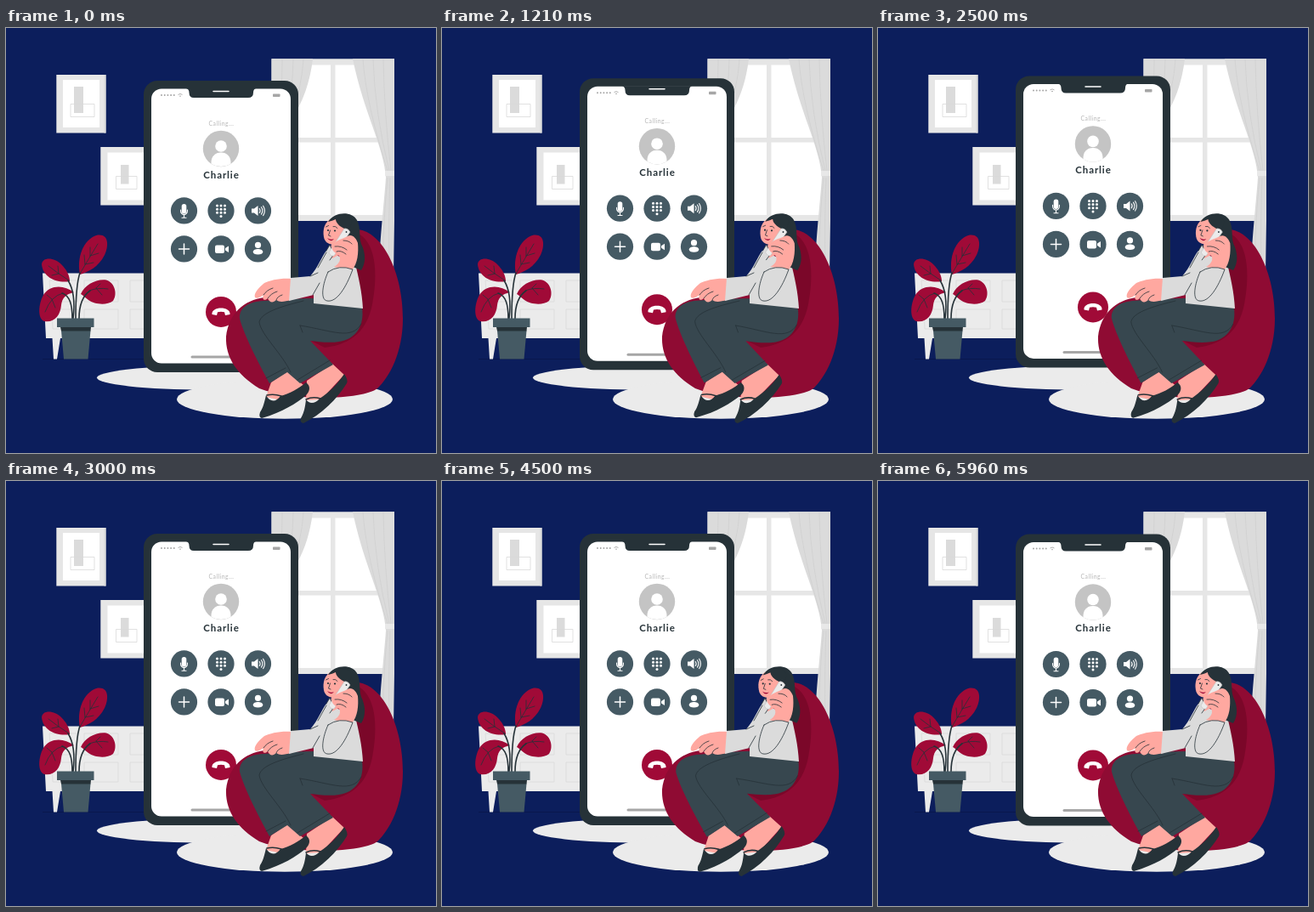
Recreate the animation shown at these times as an HTML page. Size 506 by 500 pixels, loop 6 s.

```html
<!DOCTYPE html>
<html lang="en">
<head>
<meta charset="utf-8">
<title>Calling</title>
<style>
  html, body { margin: 0; width: 100%; height: 100%; overflow: hidden; background: #0c1e5c; }
  svg { display: block; width: 100vw; height: 100vh; }
  text { font-family: Lato, "Open Sans", sans-serif; text-anchor: middle; }
  .line { fill: none; stroke: #263238; stroke-width: .8; stroke-linecap: round; stroke-linejoin: round; }
  .stem { stroke-width: 1.6; }
  .faint { fill: none; stroke: #dadada; stroke-width: .8; }
  .dark { fill: #263238; }
  .slate { fill: #455a64; }
  .pale { fill: #ebebeb; }
  .grey { fill: #dbdbdb; }
  .white { fill: #fff; }
  .red { fill: #a00a37; }
  .skin { fill: #ffa8a0; }
  .glyph { fill: none; stroke: #fff; stroke-width: 1.5; stroke-linecap: round; }
  .thin { stroke-width: 1.1; }
</style>
</head>
<body>
<svg viewBox="0 0 506 500">
  <path d="M43 389.500H300" stroke="#09164a" stroke-width=".8"/>

  <g id="window">
    <path fill="#e6e6e6" d="M312.500 36.300H457V227H312.500Z"/>
    <path class="white" d="M319 43.500H382V129H319ZM387.500 43.500H450V129H387.500ZM319 134.500H382V220H319ZM387.500 134.500H450V220H387.500Z"/>
    <path class="grey" d="M312.500 36.300H361C358 62 350 88 334 110L312.500 150Z"/>
    <path class="grey" d="M408 36.300H457V227L456 290H438.500C440 245 445 205 447 176C445 140 421 100 408 36.300Z"/>
    <path fill="none" stroke="#cfcfcf" stroke-width=".7" d="M325 37Q326 80 314 125M338 37Q338 75 326 115M350 37Q348 70 335 105M420 37Q424 90 449 168M432 37Q434 100 451 168M444 37Q445 100 453 168M449 176Q444 225 444 270M452 176Q450 225 451 280"/>
    <path fill="#e8e8e8" d="M446 168H457V174H446Z"/>
  </g>

  <g id="pictures">
    <path fill="#e6e6e6" d="M59.300 55H117.500V123.500H59.300ZM111.300 140H170V208.500H111.300Z"/>
    <path class="grey" d="M115.500 55H117.500V123.500H115.500Z"/>
    <path class="white" d="M67 61H110V117H67ZM119.500 146.500H165V202.500H119.500Z"/>
    <path class="grey" d="M80 69H91V100H80ZM135 161H144.500V183.500H135Z"/>
    <path class="faint" d="M76 89.500H104V104.500H76ZM129.500 174.500H154V189.500H129.500Z"/>
  </g>

  <g id="cabinet">
    <path class="pale" d="M43 288.500H180V365H47ZM54.500 365H64L60 389.500H56Z"/>
    <path class="faint" d="M51 297H84V322H53ZM92 297H132V322H92ZM146 297H180V322H146ZM54 331H84V354H55ZM92 331H132V354H92ZM146 331H180V354H146Z"/>
  </g>

  <g class="pale">
    <ellipse cx="235" cy="411.500" rx="128" ry="14"/>
    <ellipse cx="328" cy="436.800" rx="127" ry="23"/>
  </g>

  <g id="plant">
    <g class="red">
      <path d="M87 290C83 272 90 248 108 243.500C121 242 121 256 116 267C109 281 97 287 87 290Z"/>
      <path d="M75 298C60 301 43 293 42 278C43 269 57 270 65 278C71 284 75 291 75 298Z"/>
      <path d="M80 311C68 302 52 302 44 314C38 325 37 342 45 345C57 347 64 338 65 326C66 318 70 313 80 311Z"/>
      <path d="M88 313C93 302 106 295 118 296.500C129 300 131 314 126 321C118 327 104 325 97 320C93 317 90 314 88 313Z"/>
    </g>
    <path class="line stem" d="M79 342C81 325 80 308 73 297M82 342C82 320 83 300 87 288M86 342C86 325 90 315 99 309M78 342C78 325 75 315 66 312"/>
    <path class="line" d="M87 289Q97 272 108 254M93 278L92 267M93 278L103 276M99 268L99 258M99 268L109 265M74 297Q60 288 50 280M62 289L61 280M62 289L54 291M67 312Q53 315 46 334M54 319L48 314M54 319L58 329M98 309Q108 305 120 307M106 306L111 301M106 306L113 314"/>
    <path class="slate" d="M60 341.500H103.500V352H60ZM65 356H99.500L96.500 389.500H68Z"/>
    <path class="dark" d="M64 352H100L99.500 356.500H65Z"/>
  </g>

  <g id="phone">
    <rect class="dark" x="162" y="63" width="182" height="343" rx="16"/>
    <rect class="white" x="171" y="72.500" width="164" height="323" rx="12"/>
    <path class="dark" d="M212 72H294Q291 73 291 77Q291 83 285 83H221Q215.500 83 215.500 77Q215.500 73 212 72Z"/>
    <path class="glyph" d="M244 75.500H262"/>
    <path d="M183 80H199" stroke="#a6a6a6" stroke-width="2" stroke-linecap="round" stroke-dasharray="0 3.700"/>
    <path d="M202.500 79.500Q205 77.500 207.500 79.500M204 81.200H206" fill="none" stroke="#a6a6a6" stroke-width=".9"/>
    <rect x="314" y="78.500" width="8.500" height="3.500" rx=".7" fill="#a6a6a6"/>
    <text x="253.500" y="115.800" font-size="6.800" letter-spacing=".5" fill="#b4b4b4">Calling...</text>
    <circle cx="253" cy="143" r="21.200" fill="#c4c4c4"/>
    <circle class="white" cx="253" cy="140" r="6.800"/>
    <path class="white" d="M241.500 161C241 152 246 147.500 253 147.500S265 152 264.500 161Q253 167 241.500 161Z"/>
    <text x="253.500" y="178" font-size="11.500" font-weight="700" letter-spacing=".9" fill="#263238">Charlie</text>

    <g class="slate" id="buttons"></g>
    <rect class="white" x="206.700" y="208" width="5.600" height="11.500" rx="2.800"/>
    <path class="glyph thin" d="M205.500 215C205 222.500 214 222.500 213.500 215M209.500 221V224M207 224.300H212"/>
    <g class="white" id="keypad"></g>
    <path class="white" d="M289 213.500H292L296.500 210V222L292 218.500H289Z"/>
    <path class="glyph thin" d="M298.300 213.500Q300 216 298.300 218.500M300.500 211.800Q303.300 216 300.500 220.200M302.600 210.300Q306.200 216 302.600 221.700"/>
    <path class="glyph" d="M203.500 261H215.500M209.500 255V267"/>
    <rect class="white" x="246" y="256.500" width="11" height="9.500" rx="2"/>
    <path class="white" d="M258 260L262 257.500V265L258 262.500Z"/>
    <circle class="white" cx="296.500" cy="256.500" r="3.600"/>
    <path class="white" d="M290.700 264.500C291 260 302 260 302.300 264.500Q302 267.500 296.500 267.500T290.700 264.500Z"/>

    <circle class="red" cx="253" cy="335" r="18"/>
    <path class="white" d="M242.500 338C241 328 265 328 263.500 338L258 339L257 335.300Q253 334.300 249 335.300L248 339Z"/>
    <path d="M219 388H287" stroke="#a6a6a6" stroke-width="3" stroke-linecap="round"/>
  </g>

  <path fill="#8f0b33" d="M414 237C443 240 467 287 467 342C467 382 451 411 437 424C421 437 340 440 298 424C272 408 258 388 259 363C262 336 280 320 304 317L372 302C376 268 396 238 414 237Z"/>
  <path fill="#7b0729" d="M415 242C439 256 436 300 431 325C425 355 408 372 375 376L355 366L405 325Z"/>

  <g id="legs">
    <path class="skin" d="M312 417L331 404L350 420L324 438L306 434ZM354 415L384 395L398 408L371 437L353 438Z"/>
    <path class="dark" d="M306 432C311 441 318 440 323 433C334 430 345 424 353 417C359 421 358 428 352 433C342 441 326 452 301 459Q297 458 299 452C303 446 304 440 306 432Z"/>
    <path class="dark" d="M353 437C357 443 364 442 369 436C381 428 391 418 398 407Q403 414 401 418C390 436 371 455 350 465Q345 464 347 459C351 452 352 446 353 437Z"/>
    <path class="line stem" d="M307 432Q315 430 324 433M353 437Q361 433 370 436"/>
    <path fill="#37474f" d="M275 342C274 330 284 322 303 321C325 319 345 318 364 318L419 329C422 350 412 366 392 369C380 371 368 369 358 368L385 396L346 418L331 405L310 418C296 392 280 361 275 342Z"/>
    <path class="line" d="M350 321C322 328 300 335 298 346C300 361 325 383 335 405M418 348C407 368 384 356 346 350M346 350L349 358M306 412L329 400M343 414L381 391"/>
  </g>

  <path class="skin" d="M336 295C322 294 311 297 304 300C298 305 291 312 293 317C296 319 300 316 303 314C301 319 304 322 308 318C310 323 314 324 318 320C322 323 327 322 336 320Z"/>
  <path class="line" d="M303 314Q307 308 314 306M308 318Q312 312 319 310M318 320Q319 316 325 314"/>
  <path class="grey" d="M335 294L358 292C367 282 372 268 377 262L411 277C415 294 419 311 420 330L362 324V314L333 321Z"/>

  <g id="head">
    <path class="dark" d="M380 227C387 216 407 215 413 226C418 236 415 245 418 254C423 264 424 276 418 285L408 281L393 245Z"/>
    <path class="skin" d="M384 250L396 246L401 262L384 271L381 263Z"/>
    <path class="skin" d="M381 225C373 231 372.500 241 374.500 248C378 257 390 256 397 250L404 237L393 225Z"/>
    <path class="dark" d="M379 228C386 218 402 217 407 228L404 238C395 236 388 230 388 225Q384 227 379 228Z"/>
    <path class="grey" d="M377 262L381 255L386 266L381 273Z"/>
    <path class="line" d="M377 262L381 255L386 266L381 273"/>
    <circle class="dark" cx="379" cy="238" r="1.100"/>
    <circle class="dark" cx="387" cy="238.500" r="1.100"/>
    <path class="line" d="M376.500 234L379.500 232.500M385 233.500Q388 232.500 390 235.500M381.500 238L379.500 244L382 245"/>
    <path class="red" d="M378 247Q382 250 386 248Q382 253 378 247Z"/>
    <path class="pale" stroke="#b8b8b8" stroke-width=".5" d="M398 236Q402 235 405 240L386 268Q382 269 380 264Z"/>
    <circle class="dark" cx="400.500" cy="240" r=".9"/>
    <path class="skin" d="M384 256C388 249 397 248 402 245C407 242 412 247 414 253C415 264 414 277 407 285L386 281C393 277 395 271 391 267C386 264 382 260 384 256Z"/>
    <path class="line" d="M387 257Q395 256 401 261M389 263Q394 261 400 266M397 250Q404 250 407 254"/>
  </g>

  <path class="grey" d="M379 287Q392 278 408 284C400 306 389 323 378 321C369 320 373 300 379 287Z"/>
  <path class="line" d="M379 287Q392 278 408 284C400 306 389 323 378 321C369 320 373 300 379 287ZM377 264L367 282M358 292L367 288M361 314L369 300"/>
</svg>
<script>
  const el = id => document.getElementById(id);
  const dots = (xs, ys, r) =>
    ys.flatMap(y => xs.map(x => `<circle cx="${x}" cy="${y}" r="${r}"/>`)).join("");

  el("buttons").innerHTML = dots([209.5, 253, 296.5], [216, 261], 15.6);
  el("keypad").innerHTML =
    dots([248.5, 253, 257.5], [210, 214.2, 218.4], 1.5) + dots([253], [222.6], 1.5);

  const move = (id, value) => el(id).setAttribute("transform", value);

  function draw() {
    const t = performance.now() % 6000;
    const bob = 10 * (1 - Math.abs(1 - 2 * ((t + 40) % 1500) / 1500));
    // linear swing in degrees: 0, 1, 0, -1 over one loop
    const sway = Math.abs((t + 4500) % 6000 - 3000) / 1500 - 1;
    move("phone", `translate(0 ${-0.5 - bob})`);
    move("legs", `rotate(${sway} 347 318)`);
    move("head", `rotate(${sway} 400 310)`);
    requestAnimationFrame(draw);
  }
  draw();
</script>
</body>
</html>
```
